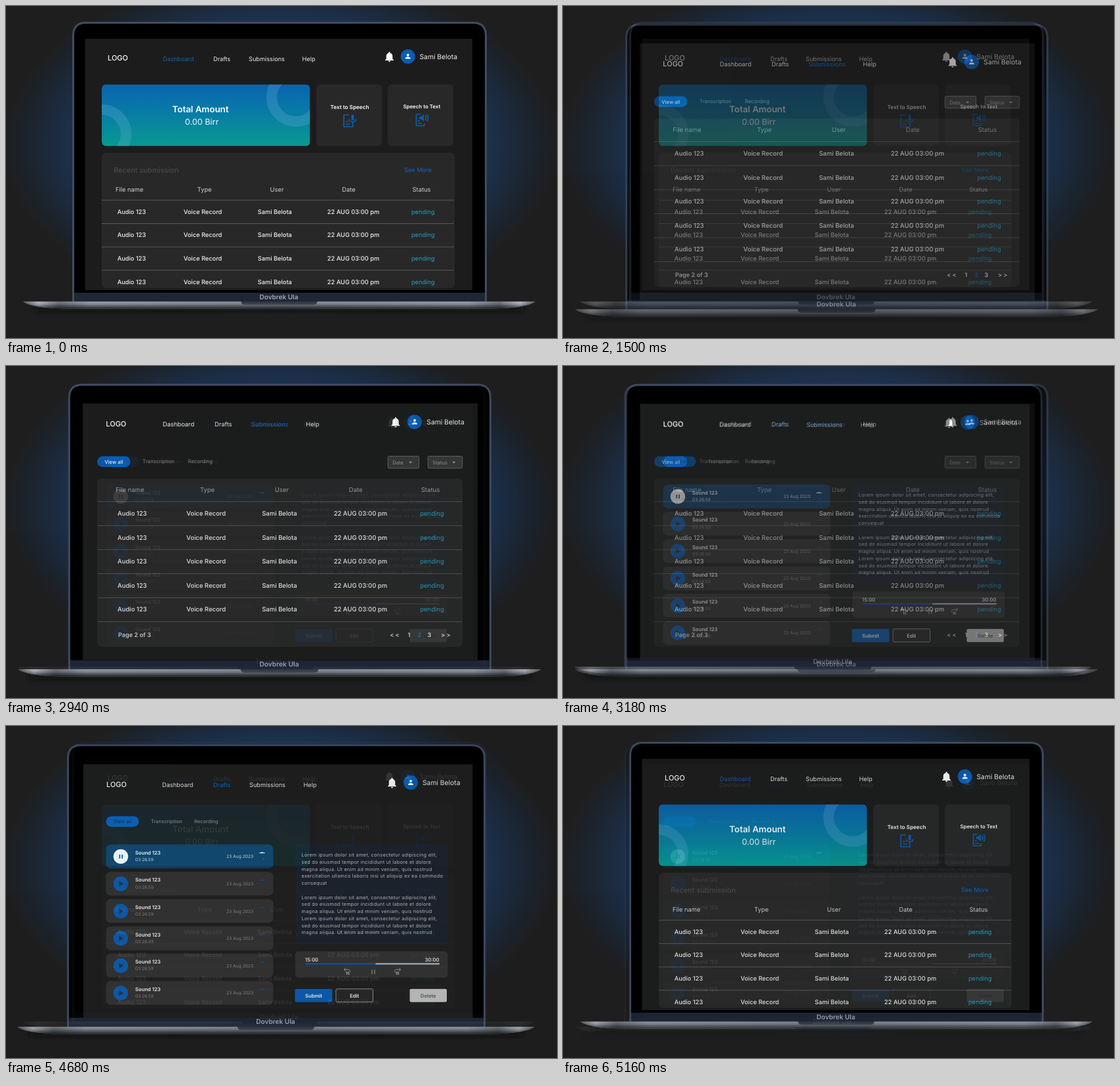
An HTML page that plays this animation: 840x506 px, repeating every 5220 ms.

```html
<!DOCTYPE html>
<html lang="en">
<head>
<meta charset="utf-8">
<title>Audio dashboard showcase</title>
<style>
  html, body { margin: 0; width: 100%; height: 100%; overflow: hidden; background: #1e1e1e; }
  svg { display: block; width: 100%; height: 100%; }
  text { font-family: Inter, sans-serif; text-rendering: geometricPrecision; white-space: pre; }

  /* Each crossfade is nine 60 ms steps of 10% */
  #submissions { animation: submissions 5220ms infinite; }
  #drafts { animation: drafts 5220ms infinite; }
  @keyframes submissions {
    0% { opacity: 0; animation-timing-function: step-end; }
    22.988% { opacity: .1; animation-timing-function: steps(9, end); }
    33.333% { opacity: 1; animation-timing-function: step-end; }
    75%, 100% { opacity: 0; }
  }
  @keyframes drafts {
    0% { opacity: 0; animation-timing-function: step-end; }
    56.321% { opacity: .1; animation-timing-function: steps(9, end); }
    66.666% { opacity: 1; animation-timing-function: step-end; }
    89.655% { opacity: .9; animation-timing-function: steps(9, end); }
    100% { opacity: 0; }
  }
</style>
</head>
<body>
<svg id="stage" viewBox="0 0 840 506" preserveAspectRatio="none">
  <defs>
    <radialGradient id="glow" gradientUnits="userSpaceOnUse" cx="0" cy="0" r="1"
      gradientTransform="translate(418 212) scale(425 265)">
      <stop offset=".5" stop-color="#1d3a5e"/>
      <stop offset=".77" stop-color="#1c2f48"/>
      <stop offset=".9" stop-color="#1c242e"/>
      <stop offset="1" stop-color="#1e1e1e"/>
    </radialGradient>
    <linearGradient id="metal">
      <stop offset="0" stop-color="#4a4f58"/>
      <stop offset=".03" stop-color="#b4b9c2"/>
      <stop offset=".07" stop-color="#676d77"/>
      <stop offset=".13" stop-color="#9398a2"/>
      <stop offset=".5" stop-color="#7f858f"/>
      <stop offset=".87" stop-color="#9398a2"/>
      <stop offset=".93" stop-color="#676d77"/>
      <stop offset=".97" stop-color="#b4b9c2"/>
      <stop offset="1" stop-color="#4a4f58"/>
    </linearGradient>
    <linearGradient id="shade" x2="0" y2="1">
      <stop offset="0" stop-color="#fff" stop-opacity=".15"/>
      <stop offset=".35" stop-color="#000" stop-opacity=".1"/>
      <stop offset="1" stop-color="#0c0e12" stop-opacity=".8"/>
    </linearGradient>
    <linearGradient id="notch" x2="0" y2="1">
      <stop offset="0" stop-color="#2a2f3b"/>
      <stop offset="1" stop-color="#444a56"/>
    </linearGradient>
    <linearGradient id="total" x2="0" y2="1">
      <stop offset="0" stop-color="#0a64ae"/>
      <stop offset=".45" stop-color="#087ba6"/>
      <stop offset="1" stop-color="#079a8f"/>
    </linearGradient>
    <filter id="soft" x="-10%" y="-200%" width="120%" height="500%">
      <feGaussianBlur stdDeviation="5 3"/>
    </filter>
    <clipPath id="card"><rect x="146" y="119.5" width="317.5" height="94" rx="6"/></clipPath>

    <g id="laptop">
      <rect x="45" y="457" width="744" height="8" fill="#0b0c0f" opacity=".75" filter="url(#soft)"/>
      <path d="M102.5 451V45Q102.5 25.5 122 25.5H712Q731.500 25.500 731.500 45V451Z" fill="#000" stroke="#3f4c62" stroke-width="3"/>
      <path d="M104 437H730V451H104Z" fill="#1f2636"/>
      <path id="base" d="M26 450.500H807C800 457 770 461.500 740 461.500H93C63 461.500 33 457 26 450.500Z" fill="url(#metal)"/>
      <path d="M26 450.500H807C800 457 770 461.500 740 461.500H93C63 461.500 33 457 26 450.500Z" fill="url(#shade)"/>
      <path d="M358.500 450H474.500V451Q474 455.500 468 455.500H365Q359 455.500 358.500 451Z" fill="url(#notch)"/>
      <text x="416" y="446.500" font-size="10" font-weight="600" fill="#a3abb9" text-anchor="middle">Dovbrek Ula</text>
    </g>
    <path id="bell" fill="#fff" d="M0 7.300A1.700 1.700 0 0 0 1.700 5.700H-1.700A1.700 1.700 0 0 0 0 7.300ZM4.800 2.800V-1.300C4.800-4 3.400-6 1.100-6.500V-7A1.100 1.100 0 0 0-1.100-7V-6.500C-3.400-6-4.800-4-4.800-1.300V2.800L-6.500 4.300V5H6.500V4.300Z"/>
    <g id="avatar">
      <circle r="11" fill="#0b5db3"/>
      <path fill="#fff" d="M0-.3A2 2 0 1 0 0-4.300A2 2 0 0 0 0-.3ZM-3.900 3.600V2.600C-3.900 1.200-1.300.6 0 .6S3.900 1.200 3.900 2.600V3.600Z"/>
    </g>
    <path id="trash" d="M-3.500-3H3.500V3.900Q3.500 5-2.500 5Q-3.500 5-3.500 3.900ZM-3.500-3V4Q-3.500 5-2.500 5H2.500Q3.500 5 3.500 4V-3ZM-4.300-4.600H-2L-1.400-5.300H1.400L2-4.600H4.300V-3.500H-4.300Z"/>
    <g id="skip" fill="none" stroke="#a5a5a5" stroke-width=".9">
      <path d="M-2-5L-4.500-2.600L-2-.3M-4.500-2.600H2Q5-2.600 5 1.500"/>
    </g>
  </defs>
</svg>
<script>
const BLUE = '#0b5db3', CYAN = '#22a0c6', PANEL = '#282828';
const USER = 'Sami Belota';

const text = (x, y, str, size, fill = '#f0f0f0', weight = 400, anchor = 'start', extra = '') =>
  `<text x="${x}" y="${y}" font-size="${size}" fill="${fill}" font-weight="${weight}" text-anchor="${anchor}" ${extra}>${str}</text>`;
const mid = (x, y, str, size, fill, weight) => text(x, y, str, size, fill, weight, 'middle');
const box = (x, y, x2, y2, r, fill, extra = '') =>
  `<rect x="${x}" y="${y}" width="${x2 - x}" height="${y2 - y}" rx="${r}" fill="${fill}" ${extra}/>`;
const path = (d, extra) => `<path d="${d}" ${extra}/>`;
const use = (id, x, y, extra = '') => `<use href="#${id}" transform="translate(${x} ${y})" ${extra}/>`;
const hline = (x, x2, y, color = '#5e5e5e', w = .9) =>
  path(`M${x} ${y}H${x2}`, `stroke="${color}" stroke-width="${w}"`);
const times = (n, fn) => Array.from({ length: n }, (_, i) => fn(i)).join('');

function scene(id, bg, place, screen, body) {
  return `<g id="${id}">${box(0, 0, 840, 506, 0, bg)}${box(0, 0, 840, 506, 0, 'url(#glow)')}
    <use href="#laptop" transform="${place}"/>${box(...screen)}${body}</g>`;
}

function header({ logo, nav, active, y, size, bell, avatar, name }) {
  const labels = ['Dashboard', 'Drafts', 'Submissions', 'Help'];
  return text(logo, y - .6, 'LOGO', 11, '#fff', 500) +
    labels.map((s, i) => text(nav[i], y, s, size, i === active ? '#1160b4' : '#ededed', 
      i === active && active ? 500 : 400)).join('') +
    use('bell', bell, y - 6.1) + use('avatar', avatar, y - 7) +
    text(name, y - 3.300, USER, 10.300, '#f4f4f4');
}

function table(cols, heads, headY, rowY, pitch, n, size, headColor) {
  const names = ['File name', 'Type', 'User', 'Date', 'Status'];
  const cells = ['Audio 123', 'Voice Record', USER, '22 AUG 03:00 pm', 'pending'];
  return names.map((s, i) => mid(heads[i], headY, s, size + .1, headColor)).join('') +
    times(n, r => cells.map((s, i) =>
      mid(cols[i], rowY + r * pitch, s, size, i === 4 ? CYAN : '#f2f2f2', i === 4 ? 400 : 500)).join(''));
}

function dashboard() {
  const ring = (x, y) => `<circle cx="${x}" cy="${y}" r="37" fill="none" stroke="#6fb4dc" stroke-opacity=".25" stroke-width="16"/>`;
  const icon = `fill="none" stroke="${BLUE}" stroke-width="1.700"`;
  return header({ logo: 155, nav: [239, 316, 370, 451.5], active: 0, y: 84, size: 9.2, bell: 584.5, avatar: 612.7, name: 630.5 }) +
    `<g clip-path="url(#card)">${box(146, 119.5, 463.5, 213.5, 6, 'url(#total)')}${ring(442, 139)}${ring(146, 195)}</g>` +
    mid(296.5, 162, 'Total Amount', 13.3, '#fff', 600) +
    mid(298.5, 181, '0.00 Birr', 12.6, '#f4f9fc') +
    box(473, 119.5, 573, 213.5, 6, PANEL) + box(582, 119.5, 682, 213.5, 6, PANEL) +
    mid(524, 157, 'Text to Speech', 8.2, '#fff', 600) +
    mid(633.8, 156, 'Speech to Text', 7.9, '#fff', 600) +
    path('M523 166H515V184H529V180M518 176H522M518 180H525M523 172.500Q523.500 176.500 528.500 176.500T533.500 172.500M528.500 176.500V180', icon) +
    box(526.5, 165.5, 530.5, 174.5, 2, BLUE) +
    path('M632 165H625.500V182.500H637.500V178.500M628 175H631M628 179H634M639 167Q641.500 170.500 639 174M641.500 165Q645.500 170.500 641.500 176', icon) +
    path('M630 168.500H633L637 165V176L633 172.500H630Z', `fill="${BLUE}"`) +
    box(146, 223.5, 684, 430, 7, PANEL) +
    text(164, 254.3, 'Recent submission', 11, '#494949', 500) +
    text(607, 253.2, 'See More', 9.2, '#1160b4', 500) +
    table([191.5, 300, 409.8, 529.5, 635.7], [188.2, 302.5, 413, 522.5, 633.5], 282.5, 316.8, 35.65, 4, 9.25, '#d0d0d0') +
    times(4, i => hline(146, 683, 296 + i * 35.6));
}

function submissions() {
  const select = (x, x2, label) => box(x, 137.5, x2, 155.8, 2, '#383838', 'stroke="#6c6c6c" stroke-width=".9"') +
    text(x + 7, 149.6, label, 7.6, '#9a9a9a') +
    path(`M${x2 - 15.500} 145.700h5l-2.500 2.700Z`, 'fill="#a8a8a8"');
  const page = (x, s, c = '#dedede') => mid(x, 412.7, s, 9, c, 600);
  return header({ logo: 152.3, nav: [239, 318, 374, 457.3], active: 2, y: 92.3, size: 9.35, bell: 594, avatar: 623, name: 641.3 }) +
    box(139, 137.5, 189.5, 154, 8.2, BLUE) +
    mid(164.3, 148.6, 'View all', 7.6, '#fff', 500) +
    text(208.3, 147.9, 'Transcription', 7.8, '#8c8c8c') + text(277.3, 147.9, 'Recording', 7.8, '#8c8c8c') +
    select(582.3, 629.7, 'Date') + select(643.3, 695.7, 'Status') +
    box(139, 171.5, 696, 428, 6, PANEL) +
    table([192.4, 305, 417, 540.4, 649.5], [189, 307, 420.5, 533.2, 647], 192.4, 228, 36.6, 5, 9.5, '#a3a3a3') +
    times(6, i => hline(139, 696, 206.7 + i * 36.6, '#585858')) +
    text(171, 412.7, 'Page 2 of 3', 9.2, '#cfcfcf', 600) +
    page(592.5, '&lt; &lt;') + page(614.5, '1') + page(630.5, '2', '#1160b4') + page(645.3, '3') + page(670.5, '&gt; &gt;');
}

function drafts() {
  const row = i => {
    const y = 180.6 + i * 41.6, c = y + 18.3, on = !i;
    const sign = on
      ? path(`M173.300 ${c - 3}v6M177.100 ${c - 3}v6`, `stroke="${BLUE}" stroke-width="1.800"`)
      : path(`M172.300 ${c - 4.300}v8.600l7-4.300Z`, 'fill="#2b333d"');
    return box(152.5, y, 407.5, y + 36.3, 7, on ? '#133f69' : '#333') +
      `<circle cx="175" cy="${c}" r="11.200" fill="${on ? '#fff' : BLUE}"/>` + sign +
      text(197, y + 15.2, 'Sound 123', 7.7, '#fff', 600) +
      text(197, y + 25.3, '03:26.59', 6.6, on ? '#d3dae2' : '#858585') +
      text(336, y + 20.8, '23 Aug 2023', 6.7, on ? '#d3dae2' : '#8a8a8a') +
      use('trash', 390.4, y + 17, `fill="${on ? '#fff' : '#1b4a7a'}"`);
  };
  const lorem = ['Lorem ipsum dolor sit amet, consectetur adipiscing elit,',
    'sed do eiusmod tempor incididunt ut labore et dolore',
    'magna aliqua. Ut enim ad minim veniam, quis nostrud'];
  const lines = [...lorem, 'exercitation ullamco laboris nisi ut aliquip ex ea commodo', 'consequat', '', ...lorem, ...lorem];
  lines.splice(8, 1, lorem[2]);
  const button = (x, x2, label, fill, color, extra) =>
    box(x, 400.7, x2, 420.7, 2, fill, extra) + mid((x + x2) / 2, 413.5, label, 7.7, color, 600);
  return header({ logo: 153, nav: [238, 316, 371, 453.5], active: 1, y: 93.3, size: 9.2, bell: 588.5, avatar: 617, name: 635 }) +
    box(152.5, 137.5, 202.5, 153.7, 8.1, BLUE) +
    mid(177.5, 148.4, 'View all', 7.5, '#1b3048', 500) +
    text(221, 148.3, 'Transcription', 7.5, '#858585', 500) + text(287, 148.3, 'Recording', 7.5, '#858585', 500) +
    times(6, row) +
    box(441, 180, 673.5, 333, 5, '#1a222c') +
    lines.map((s, i) => text(450.5, +(199 + i * 10.77).toFixed(2), s, 7.4, '#bcbec0', 400, 'start', 'letter-spacing=".25"')).join('') +
    box(441, 343.5, 673.5, 383.5, 5, '#333') +
    text(456, 358.8, '15:00', 7.7, '#fff', 500) + text(660.5, 358.8, '30:00', 7.7, '#fff', 500, 'end') +
    hline(457, 564, 362.4, BLUE, 2) + hline(563.5, 661, 362.4, '#b4cbe6', 2) +
    use('skip', 519.7, 373.8) + use('skip', 597.3, 373.8, 'style="transform:translate(597.3px,373.800px) scaleX(-1)"') +
    mid(520.8, 379.3, '15', 6, '#d0d0d0', 600) + mid(596.5, 379.3, '15', 6, '#d0d0d0', 600) +
    path('M558 371.500v6.500M562 371.500v6.500', 'stroke="#9a9a9a" stroke-width="1.200"') +
    button(440.5, 497.5, 'Submit', BLUE, '#fff') +
    button(503, 559.5, 'Edit', '#262626', '#fff', 'stroke="#9c9c9c" stroke-width=".9"') +
    button(615.5, 672, 'Delete', '#c4c4c4', '#5c5c5c');
}

document.getElementById('stage').insertAdjacentHTML('beforeend',
  scene('dashboard', '#1e1e1e', '', [120.5, 50, 711, 433, 0, '#1c1c1c'], dashboard()) +
  scene('submissions', '#1e1e1e', 'translate(-8.1 2.5) scale(1.0206)', [117, 57, 719, 448, 0, '#1c1c1c'], submissions()) +
  scene('drafts', '#1e1e1e', 'translate(-9 3.6) scale(1.0095)', [118, 58.3, 711.5, 445, 0, '#1d1f1e'], drafts()));
</script>
</body>
</html>
```
